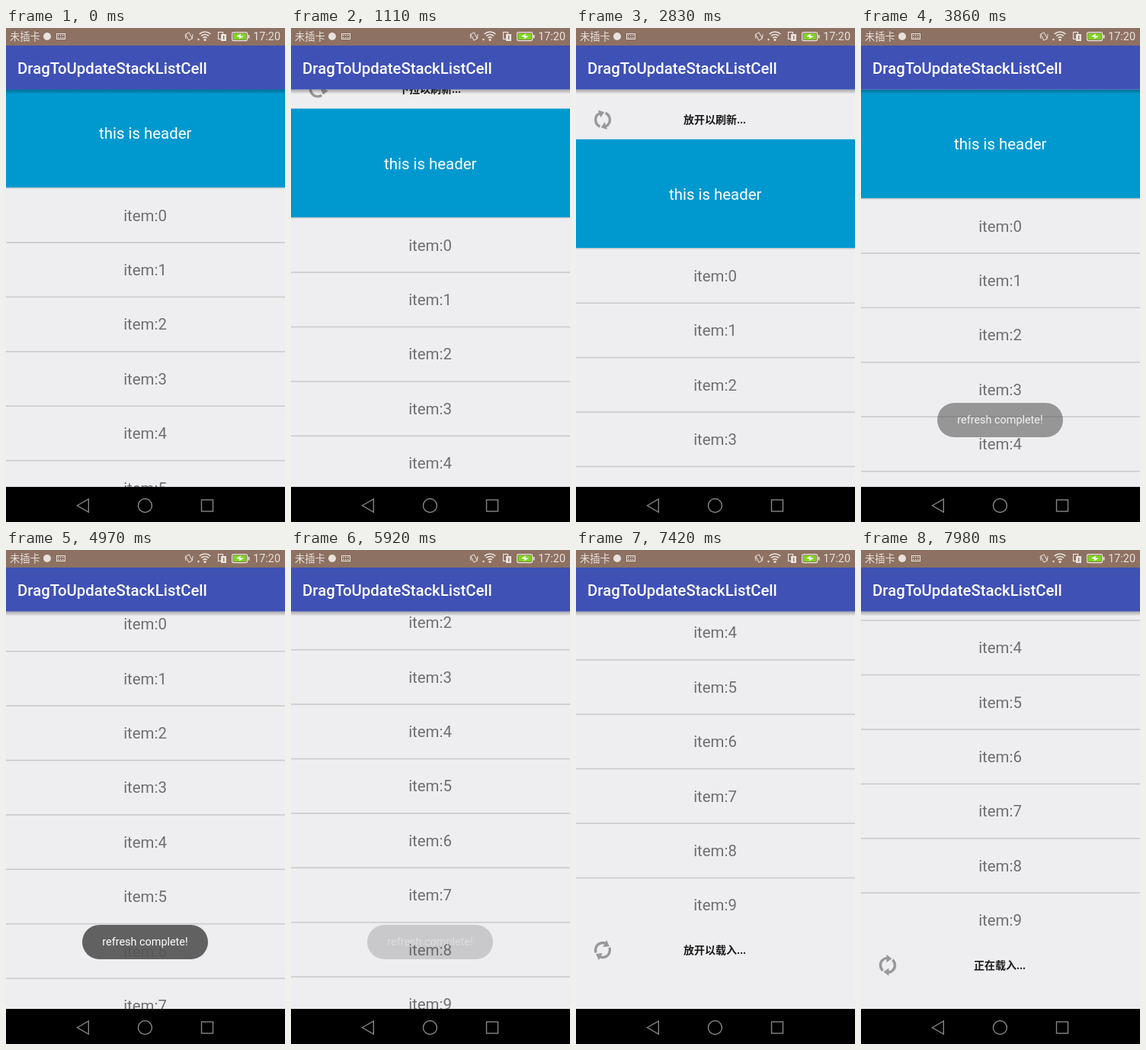
Recreate the animation shown at these times as an HTML page with a canvas. Size 366 by 647 pixels, loop 8 s.

```html
<!DOCTYPE html>
<html lang="en">
<head>
<meta charset="utf-8">
<title>Pull to refresh list</title>
<style>
html, body { margin: 0; width: 100%; height: 100%; overflow: hidden; background: #000; }
canvas { display: block; width: 366px; height: 647px; }
</style>
</head>
<body>
<canvas id="stage"></canvas>
<script>
const W = 366, H = 647, LOOP = 8000;
const TOP = 80.5, BOTTOM = 601, HEADER = 142.8, ROW = 71.4, ROWS = 10;
const LATIN = 'Roboto, sans-serif', CJK = '"Noto Sans CJK SC", "Noto Sans CJK", sans-serif';
const canvas = document.getElementById('stage');
const c = canvas.getContext('2d');
const dpr = window.devicePixelRatio || 1;
canvas.width = W * dpr;
canvas.height = H * dpr;

// Screen updates: first, last, number of steps; the picture rests in between.
const RUNS = [[0, 0, 1], [810, 1790, 8], [2290, 3260, 8], [3410, 4290, 7],
  [4570, 5350, 7], [5620, 6220, 5], [6880, 7830, 8], [7980, 7980, 1]];
// List offset in px over time; positive means pulled down.
const SCROLL = [[0, -14], [720, -14], [1250, 36], [1720, 0], [2230, 0], [3000, 73],
  [3250, 65], [3500, 65], [3800, 0], [4470, 0], [5300, -256], [5520, -256],
  [6200, -337], [6720, -337], [7400, -437], [7780, -417], [LOOP, -417]];

const clamp = v => Math.max(0, Math.min(1, v));

function stepped(t) {
  const [start, end, n] = RUNS.filter(r => r[0] <= t).pop();
  if (n === 1) return start;
  const gap = (end - start) / (n - 1);
  return start + gap * Math.min(n - 1, Math.floor((t - start) / gap + 0.12));
}

function scrollAt(t) {
  const i = SCROLL.findIndex(k => k[0] > t);
  const [t0, v0] = SCROLL[i - 1], [t1, v1] = SCROLL[i];
  const u = (t - t0) / (t1 - t0);
  return v0 + (v1 - v0) * u * u * (3 - 2 * u);
}

function rect(x, y, w, h, color) {
  c.fillStyle = color;
  c.fillRect(x, y, w, h);
}

// y is the vertical middle of the line.
function text(s, x, y, size, color, { align = 'center', weight = 400, family = LATIN } = {}) {
  c.font = `${weight} ${size}px ${family}`;
  c.textAlign = align;
  c.fillStyle = color;
  c.fillText(s, x, y + size * 0.345);
}

function polygon(points, color) {
  c.beginPath();
  points.forEach(([x, y]) => c.lineTo(x, y));
  c.closePath();
  c.fillStyle = color;
  c.fill();
}

function syncIcon(y, angle) {
  c.save();
  c.translate(35, y);
  c.rotate(angle);
  c.strokeStyle = '#989898';
  c.lineWidth = 3.4;
  for (let i = 0; i < 2; i++) {
    c.beginPath();
    c.arc(0, 0, 9.5, 2.3, 4.6);
    c.stroke();
    polygon([[-1.5, -14], [5.5, -8.6], [-1.5, -3.6]], '#989898');
    c.rotate(Math.PI);
  }
  c.restore();
}

function loader(label, y, angle) {
  syncIcon(y, angle);
  text(label, 182, y, 14, '#1b1b1b', { weight: 700, family: 'Roboto, ' + CJK });
}

function list(t) {
  const off = scrollAt(t), top = TOP + off;
  rect(0, 23, W, BOTTOM - 23, '#eeeef0');

  if (off > 0) {
    const busy = t >= 3200;
    const label = busy ? '正在刷新...' : off >= 62 ? '放开以刷新...' : '下拉以刷新...';
    const turn = busy ? (t - 3200) / 1200 * 2 * Math.PI : (off / 65 - 1) * Math.PI / 2;
    loader(label, top - 25.5, turn - 0.35);
  }

  rect(0, top, W, HEADER, '#0099cf');
  text('this is header', 182.7, top + HEADER / 2 + 0.5, 20.4, '#fff');
  for (let i = 0; i < ROWS; i++) {
    const y = top + HEADER + i * ROW;
    rect(0, y - 0.5, W, 1.6, '#cbcbcd');
    text('item:' + i, 182.5, y + ROW / 2 + 0.5, 20.4, '#6f6f70');
  }

  const footer = top + HEADER + ROWS * ROW + 23.5;
  const label = t >= 7980 ? '正在载入...' : t > 7150 ? '放开以载入...' : '上拉以载入...';
  loader(label, footer, t >= 7980 ? 0 : -(off + 417) / 65 * Math.PI / 2);
}

function toast(t) {
  const alpha = Math.min(clamp((t - 3540) / 500), clamp((6050 - t) / 500));
  if (!alpha) return;
  c.globalAlpha = alpha * 0.92;
  c.beginPath();
  c.roundRect(100, 491, 165, 45, 22.5);
  c.fillStyle = '#555';
  c.fill();
  c.globalAlpha = Math.min(1, alpha * 1.4);
  text('refresh complete!', 182.5, 513.5, 14.4, '#fff');
  c.globalAlpha = 1;
}

function statusBar() {
  const ink = '#e9e2de';
  rect(0, 0, W, 23, '#8d7162');
  text('未插卡', 5, 11.5, 13.3, ink, { align: 'left', family: CJK });
  text('17:20', 360, 11.5, 14.4, ink, { align: 'right' });
  c.strokeStyle = c.fillStyle = ink;
  c.lineWidth = 1;

  c.beginPath();
  c.arc(54, 11, 5, 0, 7);
  c.fill();

  c.strokeRect(66.5, 7.5, 11, 7);
  for (let x = 68; x < 76; x += 3) {
    c.fillRect(x, 9, 1.5, 1.2);
    c.fillRect(x, 12, 1.5, 1.2);
  }

  c.save();
  c.translate(240, 11);
  c.rotate(-0.5);
  c.strokeRect(-2.5, -4.5, 5, 9);
  c.restore();
  c.beginPath();
  c.moveTo(235, 9); c.lineTo(236, 14);
  c.moveTo(245, 8); c.lineTo(244.5, 13);
  c.stroke();

  c.lineWidth = 1.6;
  for (const r of [4, 7.5, 11]) {
    c.beginPath();
    c.arc(261, 16, r, -2.3, -0.84);
    c.stroke();
  }
  c.beginPath();
  c.arc(261, 15.5, 1.6, 0, 7);
  c.fill();
  polygon([[251, 14], [254, 14], [252.5, 17]], ink);

  c.lineWidth = 1.2;
  c.strokeRect(278.5, 5.5, 6, 9);
  c.fillRect(282, 8, 7, 9);
  rect(285, 10, 1.3, 5, '#8d7162');

  c.beginPath();
  c.roundRect(296.6, 5.6, 20, 11, 2);
  c.stroke();
  rect(317.5, 9, 2, 4.5, ink);
  rect(298, 7, 17.2, 8.2, '#7ed321');
  polygon([[302, 11], [308, 7.5], [307.5, 10.4], [312, 10.8], [305.5, 14.6], [306.3, 11.7]], '#fff');
}

function toolbar() {
  const shade = c.createLinearGradient(0, TOP, 0, TOP + 6);
  shade.addColorStop(0, 'rgba(0,0,0,.3)');
  shade.addColorStop(1, 'rgba(0,0,0,0)');
  rect(0, TOP, W, 6, shade);
  rect(0, 23, W, TOP - 23, '#3f51b5');
  text('DragToUpdateStackListCell', 15, 52.7, 20.33, '#fff', { align: 'left', weight: 500 });
}

function navBar() {
  rect(0, BOTTOM, W, H - BOTTOM, '#000');
  c.strokeStyle = '#858585';
  c.lineWidth = 1.4;
  c.beginPath();
  c.moveTo(93.5, 625.5); c.lineTo(108.3, 617); c.lineTo(108.3, 634);
  c.closePath();
  c.stroke();
  c.beginPath();
  c.arc(182.4, 625.5, 9, 0, 7);
  c.stroke();
  c.strokeRect(256.5, 618, 15, 15);
}

function draw(now) {
  const t = stepped(now % LOOP);
  c.setTransform(dpr, 0, 0, dpr, 0, 0);
  list(t);
  toast(t);
  toolbar();
  statusBar();
  navBar();
  requestAnimationFrame(draw);
}
requestAnimationFrame(draw);
</script>
</body>
</html>
```
